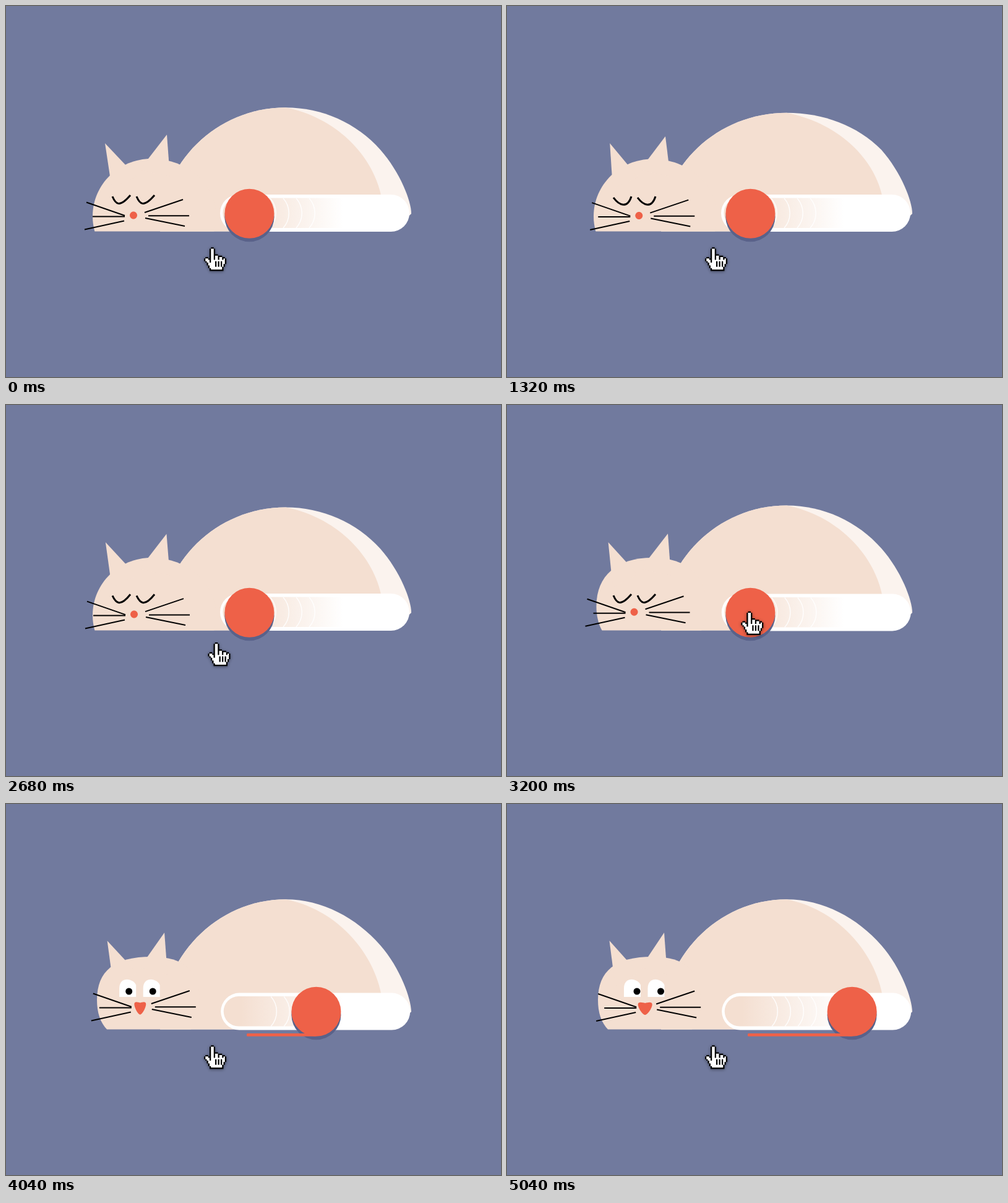
Write an HTML page with a canvas that moves like this. It is 800 px wide and 600 px high and loops after 5400 ms.

```html
<!DOCTYPE html>
<html lang="en">
<head>
<meta charset="utf-8">
<title>Sleeping cat slider</title>
<style>
html, body { margin: 0; height: 100%; overflow: hidden; background: #717a9e; }
canvas { display: block; }
</style>
</head>
<body>
<canvas id="stage" width="800" height="600"></canvas>
<script>
const ctx = document.getElementById('stage').getContext('2d');
const LOOP = 5400, STEP = 40, LAST = 5040, FLOOR = 364.5;
const FUR = '#f4dfd1', SHINE = '#fbf3ee', CORAL = '#ee6148', SHADE = '#59628a';

const HAND = [
  '     ##', '    #..#', '    #..#', '    #..#', '    #..#', '    #..###',
  '    #..#..###', ' ## #..#..#..##', '#..##..#..#..#.#', '#...#..........#',
  ' #..#...#.#.#..#', '  #.....#.#.#..#', '  #.....#.#.#.#', '   #....#.#.#.#',
  '   #.........#', '    #........#', '    ##########'
];

// timing helpers
const span = (t, from, length) => Math.min(1, Math.max(0, (t - from) / length));
const sine = x => (1 - Math.cos(Math.PI * x)) / 2;
const quad = x => x < .5 ? 2 * x * x : 1 - 2 * (1 - x) ** 2;
const cubicOut = x => 1 - (1 - x) ** 3;
const mix = (a, b, x) => a + (b - a) * x;

// drawing helpers
function fill(color, path) {
  ctx.fillStyle = color;
  ctx.fill(path instanceof Path2D ? path : new Path2D(path));
}
function stroke(color, width, path) {
  ctx.strokeStyle = color;
  ctx.lineWidth = width;
  ctx.stroke(new Path2D(path));
}
function disc(color, x, y, r) {
  const p = new Path2D();
  p.arc(x, y, r, 0, 2 * Math.PI);
  fill(color, p);
}
function pill(color, x, y, w, h, r) {
  const p = new Path2D();
  p.roundRect(x, y, w, h, r);
  fill(color, p);
}

function pixels(rows, size, keep) {
  const p = new Path2D();
  rows.forEach((row, y) => [...row].forEach((c, x) => {
    if (keep(c)) p.rect(x * size, y * size, size, size);
  }));
  return p;
}
const handShape = pixels(HAND, 2.25, c => c !== ' ');
const handLight = pixels(HAND, 2.25, c => c === '.');

function drawBody(top) {
  const d = top - 164.3, lift = Math.min(d, 0) * .4;
  const c2 = 189 + d * .5, joint = 232.6 + lift;
  fill(SHINE, `M249 ${FLOOR}C249 ${mix(FLOOR, top, .552)} 340 ${top} 452 ${top}
    C510.6 ${top} 566.5 ${c2} 605 ${joint}C637 ${269 + lift} 655 315.7 655 336L640 350L600 ${FLOOR}Z`);
  fill(FUR, `M249 ${FLOOR}C249 ${mix(FLOOR, top, .552)} 340 ${top} 452 ${top}
    C530 ${top + 15} 591 ${238 + d * .4} 606 306V${FLOOR}Z`);
}

function drawHead(p, h, q) {
  const cx = 235, cy = mix(340, 317, h), ry = mix(93, 70, h) - p * .5;
  const left = mix(95, 88, h), right = mix(105, 78, h), k = mix(.552, .676, h);
  ctx.save();
  ctx.beginPath();
  ctx.rect(0, 0, 800, FLOOR);
  ctx.clip();
  const head = new Path2D();
  head.moveTo(cx - left, cy);
  for (const [rx, sx, sy, turn] of [[left, -1, -1, 0], [right, 1, -1, 1], [right, 1, 1, 0], [left, -1, 1, 1]]) {
    const x = cx + sx * rx, y = cy + sy * ry, kx = cx + sx * rx * k, ky = cy + sy * ry * k;
    if (turn) head.bezierCurveTo(kx, y, x, ky, x, cy);
    else head.bezierCurveTo(x, ky, kx, y, cx, y);
  }
  fill(FUR, head);
  const tip = 160 + 6.5 * p + 4 * Math.sin(Math.PI * h) + 5.5 * q;
  fill(FUR, `M${tip} ${222 - q}L${171 + 4 * q} 295L${211 + p + q} ${276 + p - 3 * h}Z`);
  fill(FUR, `M${260 - 4.2 * p - 6 * q} ${208 + 3 * p}L${265 - p - 6 * q} 276L${216 - p} 265Z`);
  ctx.restore();
}

function drawTrack(x, y) {
  pill('#fff', x, y, 306, 60, 30);
  const g = ctx.createLinearGradient(380, 0, 545, 0);
  g.addColorStop(0, FUR);
  g.addColorStop(1, '#fff');
  pill(g, x + 4.5, y + 5.5, 220, 48.5, 24);
  for (let i = 0; i < 4; i++) {
    const ax = x + 90 + i * 21;
    stroke('rgba(255,255,255,.85)', 1.5, `M${ax - 9} ${y + 6}A36 36 0 0 1 ${ax - 9} ${y + 54}`);
  }
}

function drawKnob(q) {
  const x = 393.4 + 164.2 * q;
  disc(SHADE, x, 341.3, 40);
  if (q > 0) pill(CORAL, 389, 371, x - 389, 4.7, 1.5);
  disc(CORAL, x, 335.7, 40);
}

function drawEyes(p, q, open) {
  if (!open) {
    for (const dx of [0, 39]) {
      stroke('#000', 3, `M${172 + dx} ${308 + 2 * p}C${177 + 5 * p + dx} ${320 + 3 * p}
        ${183 + 12 * p + dx} ${327 + p} ${201 + dx} ${306 + 2 * p}`);
    }
    return;
  }
  ctx.save();
  ctx.translate(0, 312);
  ctx.scale(1, open);
  for (const dx of [0, 38.5]) {
    const x = 172 + 17 * q + dx;
    fill('#fff', `M${x} 0v-14c0 -19 22 -17 27 -5v19z`);
    disc('#000', 177 + 33 * q + dx, -9, 5.5);
  }
  ctx.restore();
}

function drawMuzzle(dx, dy, q, open) {
  ctx.save();
  ctx.translate(dx, dy);
  stroke('#000', 2, `M130 317.5L192 339M140 340.5H192M127 361.5L191 347.5
    M224 334L286 313M230 339.3H296M225 343L289 356`);
  ctx.translate(206, 338.5);
  // right half of the nose: a circle that turns into a heart
  const round = [0, -6, 3.3, -6, 6, -3.3, 6, 0, 6, 3.3, 3.3, 6, 0, 6];
  const heart = [0, -6, 4, -7, 11.5, -9, 11.5, -4, 11.5, 2, 4, 13, 0, 13];
  const width = (11 + 12 * q) / 23;
  const v = round.map((n, i) => mix(n, heart[i] * (i % 2 ? 1 : width), open));
  const nose = new Path2D();
  nose.moveTo(v[0], v[1]);
  nose.bezierCurveTo(...v.slice(2, 8));
  nose.bezierCurveTo(...v.slice(8));
  nose.bezierCurveTo(-v[10], v[11], -v[8], v[9], -v[6], v[7]);
  nose.bezierCurveTo(-v[4], v[5], -v[2], v[3], v[0], v[1]);
  fill(CORAL, nose);
  ctx.restore();
}

function drawHand(reach) {
  ctx.save();
  ctx.translate(320 + 58.3 * reach, 390.3 - 56.5 * reach);
  ctx.shadowColor = 'rgba(0,0,0,.45)';
  ctx.shadowBlur = 5;
  ctx.shadowOffsetY = 1;
  fill('#000', handShape);
  ctx.shadowColor = 'transparent';
  fill('#fff', handLight);
  ctx.restore();
}

function draw(t) {
  const breath = t < 3040 ? sine(t / 1520) : 0;
  const rise = sine(span(t, 3040, 560));
  const squash = cubicOut(span(t, 3040, 560));
  const sniff = sine(span(t, 3040, 420));
  const open = span(t, 3520, 120);
  const slide = cubicOut(span(t, 3600, 1465));
  const reach = quad(span(t, 2595, 360)) - quad(span(t, 3560, 360));

  ctx.fillStyle = '#717a9e';
  ctx.fillRect(0, 0, 800, 600);
  drawBody(164.3 + 8.7 * breath - 10 * rise);
  drawHead(breath, squash, slide);
  drawTrack(346 + 1.2 * squash, 305 + .6 * squash);
  drawKnob(slide);
  drawEyes(breath, slide, open);
  drawMuzzle(7.6 * breath - 1.5 * sniff + 18.7 * slide,
             .6 * breath - 12 * sniff + 1.5 * slide, slide, open);
  drawHand(reach);
}

const start = performance.now();
function frame() {
  const t = (performance.now() - start) % LOOP;
  draw(Math.min(LAST, Math.floor(t / STEP) * STEP));
  requestAnimationFrame(frame);
}
frame();
</script>
</body>
</html>
```
